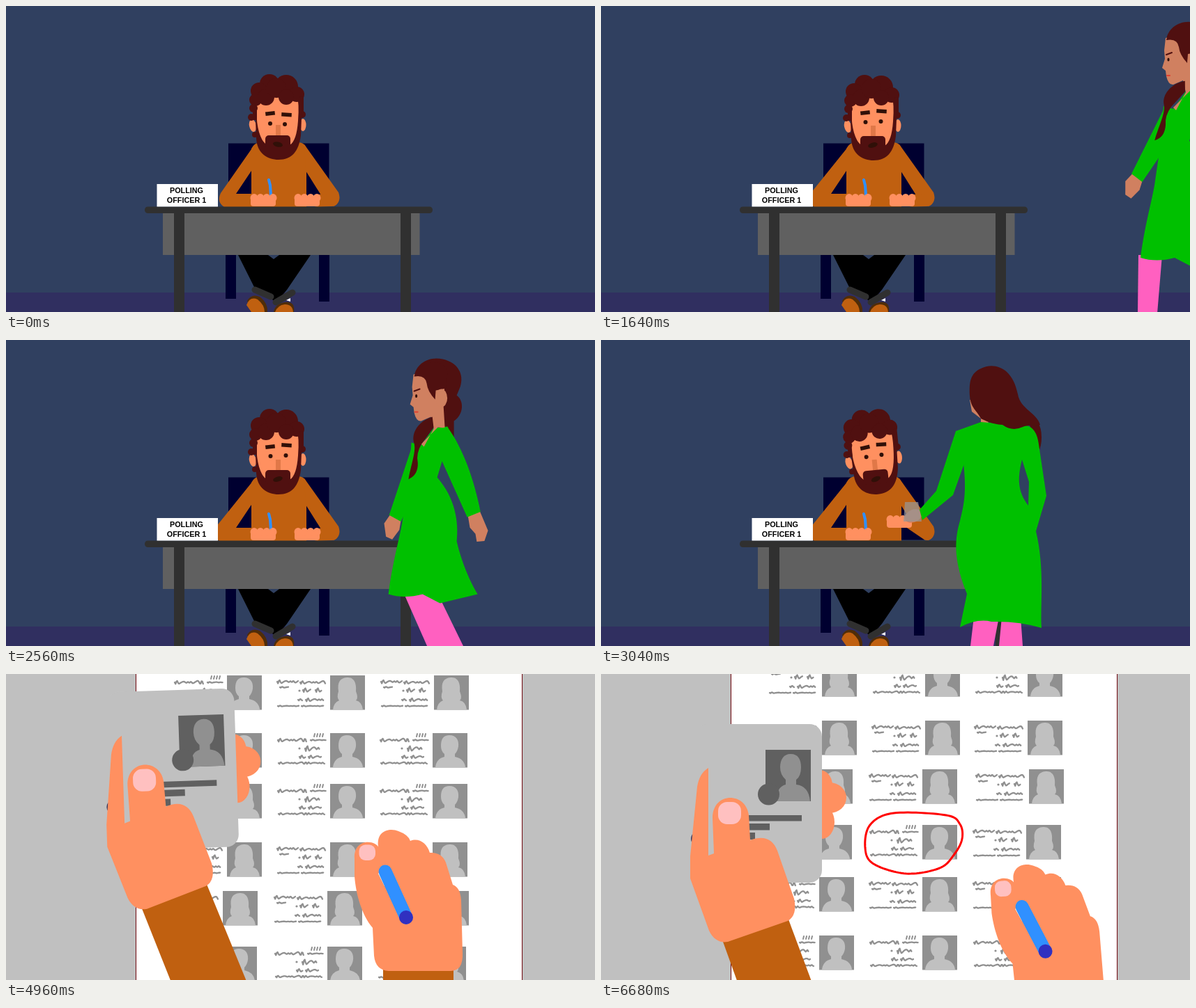
Write an HTML page with a canvas that moves like this. It is 845x440 px and loops after 7.16 s.

```html
<!DOCTYPE html>
<html lang="en">
<head>
<meta charset="utf-8">
<title>Polling officer</title>
<style>
  html, body { margin: 0; width: 100%; height: 100%; overflow: hidden; background: #304060; }
  canvas { display: block; width: 845px; height: 440px; }
</style>
</head>
<body>
<canvas id="stage" width="845" height="440"></canvas>
<script>
const ctx = document.getElementById('stage').getContext('2d');
const LOOP = 7160, STEP = 40;
const HAIR = '#501010', PEACH = '#ff9060', RUST = '#c06010', DARK = '#303030';
const NAVY = '#000030', SKIN = '#d08060', GREEN = '#00c000', PINK = '#ff60c0';
const PALE = '#c0c0c0', MID = '#909090', GREY = '#606060', NAIL = '#ffc0c0', BLUE = '#3090ff';

const clamp01 = v => Math.min(1, Math.max(0, v));
const mix = (a, b, p) => a + (b - a) * p;

function rect(color, x, y, w, h, r = 0) {
  ctx.fillStyle = color;
  ctx.beginPath();
  ctx.roundRect(x, y, w, h, r);
  ctx.fill();
}
function oval(color, x, y, rx, ry = rx, turn = 0) {
  ctx.fillStyle = color;
  ctx.beginPath();
  ctx.ellipse(x, y, rx, ry, turn, 0, 7);
  ctx.fill();
}
function shape(color, d, rule) {
  ctx.fillStyle = color;
  ctx.fill(new Path2D(d), rule || 'nonzero');
}
function line(color, width, points, cap = 'round') {
  ctx.strokeStyle = color;
  ctx.lineWidth = width;
  ctx.lineCap = cap;
  ctx.lineJoin = 'round';
  ctx.beginPath();
  points.forEach(([x, y]) => ctx.lineTo(x, y));
  ctx.stroke();
}
// Draws a group moved by dx, dy and turned about px, py.
function group(dx, dy, turn, px, py, draw) {
  ctx.save();
  ctx.translate(px + dx, py + dy);
  ctx.rotate(turn);
  ctx.translate(-px, -py);
  draw();
  ctx.restore();
}

// ---------- Office ----------
function room() {
  rect('#304060', 0, 0, 845, 440);
  rect('#302f60', 0, 412, 845, 28);
  rect(NAVY, 319, 197.5, 144.5, 90);
  rect(NAVY, 315, 350, 15, 71);
  rect(NAVY, 449, 350, 15, 75);
}

function fist(x, y) {
  rect(PEACH, x + 1, y + 5, 36, 13, 4);
  for (let i = 0; i < 4; i++) oval(PEACH, x + 6 + i * 9, y + 6, 5.5, 6);
}

function manBody(elbow, reach) {
  shape('#000', 'M333 358H376L384 364L392 358H437L403 408L388 426L357 406Z');
  line(DARK, 9, [[357, 408], [380, 418]]);
  line(DARK, 9, [[387, 426], [411, 412]]);
  shape('#502d08', 'M346 424Q352 413 364 418Q376 427 375 440H352Z');
  shape('#502d08', 'M384 440Q386 428 400 426Q415 424 413 440Z');
  shape(RUST, 'M345 430Q350 417 361 422Q371 430 371 440H352Z');
  shape(RUST, 'M386 440Q390 430 400 429Q411 429 412 440Z');
  shape('#fff', 'M402 423L408 420V425Z');

  shape(RUST, 'M352 205Q356 197 364 196H420Q430 197 431 206V289H352Z');
  shape(RUST, `M354 203L${308 - elbow} 269Q${302 - elbow} 282 ${313 - elbow} 289H354V270H330L354 234Z`);
  shape(RUST, 'M428 199L477 268Q482 282 470 288L452 272L430 237Z');
  const hx = mix(413, 409, reach), hy = mix(270, 252, reach);
  line(RUST, 18, [[468, 279], [hx + 34, hy + 10]]);
  line(BLUE, 4, [[377, 250], [379, 258], [380, 272]]);
  fist(350, 270);
  fist(hx, hy);
}

function manHead(lift, tilt, look) {
  group(tilt, lift, -.1 * tilt, 391, 165, () => {
    oval(PEACH, 354, 172, 5, 9, -.2);
    oval(PEACH, 426, 171, 4.5, 9);
    shape(HAIR, 'M357 135L359 190C360 212 375 221 391 221C410 221 420 209 423 186L425 135Z');
    shape(PEACH, 'M361 125C358 150 359 172 365 187Q369 197 375 200H407Q417 194 419 165Q421 140 417 125Z');
    [[378, 112, 14], [402, 116, 17], [363, 122, 12], [358, 135, 9], [355, 147, 6], [352, 160, 5],
     [417, 127, 11], [373, 131, 12], [388, 118, 14], [402, 131, 11], [425, 156, 5], [357, 185, 4]]
      .forEach(([x, y, r]) => oval(HAIR, x, y, r));
    rect(HAIR, 354, 140, 6, 24);
    rect(HAIR, 420, 130, 7, 30, 3);
    rect('#e07848', 387, 171, 7, 17);
    rect(HAIR, 372, 186, 36, 20, 5);
    line('#301008', 5.5, [[375, 155 - look * 2], [383, 154 - look * 2]], 'square');
    line('#301008', 5.5, [[398, 156 - look * 6], [407, 156.5 - look * 6]], 'square');
    oval('#301008', 379 + look * .5, 169 - look * 3, 3);
    oval('#301008', 400 + look * 1.5, 170 - look * 5, 3);
    oval('#301008', 390, 199, 7, 3.5, mix(.2, -.3, look));
  });
}

function desk() {
  rect(GREY, 225, 294, 368.5, 64);
  rect(DARK, 241, 294, 15, 146);
  rect(DARK, 566, 294, 15, 146);
  rect(DARK, 199, 288.5, 413, 9.5, 4.5);
  rect('#fff', 216.5, 256, 87.5, 32.5);
  ctx.fillStyle = '#000';
  ctx.font = 'bold 10.8px "Liberation Sans", Arial, sans-serif';
  ctx.textAlign = 'center';
  ctx.fillText('POLLING', 259, 269);
  ctx.fillText('OFFICER 1', 259, 283);
}

function womanWalking(x, t) {
  const swing = Math.cos((t - 1640) / 747 * Math.PI * 2), spread = Math.abs(swing);
  const leg = s => {
    const top = 682 - 31 * s, foot = 721 - 74 * s, half = 18 - 4 * spread;
    shape(PINK, `M${top - half - 3} 362H${top + half + 3}L${foot + half} 446H${foot - half}Z`);
  };
  group(x - 668, -4 * spread, 0, 0, 0, () => {
    shape(HAIR, 'M674 53C676 35 695 23 715 28C737 33 746 50 740 68L735 80C746 88 745 108 731 117V150L712 130Z');
    group(0, 0, swing * .16, 680, 150, () => {
      shape(SKIN, 'M641 253L633 265L636 284L645 288L655 274L657 260Z');
      shape(GREEN, 'M672 150L700 170L657 262L640 253Z');
    });
    leg(-swing);
    leg(swing);
    shape(GREEN, 'M702 127L722 125L730 150L714 175L707 198C733 228 738 262 735 290C742 320 754 348 765 366L711 379L686 366Q660 373 637 366C643 320 652 290 657 262L666 200L670 148L684 152Z');
    shape(SKIN, 'M673 50L671 68L672 80L668 93L673 97L674 105Q677 118 684 117L698 111L702 128L688 154L684 150L708 126L718 127L716 95L718 60L695 45Z');
    shape(HAIR, 'M674 53C680 30 715 25 722 45L720 70L705 73L704 86Q693 74 692 63Q690 50 674 53Z');
    oval(SKIN, 713, 84, 8.5, 13);
    line(HAIR, 2, [[674, 74], [682, 71]]);
    oval('#301008', 677, 81, 1.6, 2.5);
    line('#e04030', 2, [[675, 104], [679, 104]]);
    group(0, 0, swing * .12, 694, 118, () =>
      shape(HAIR, 'M700 111C680 117 670 135 674 148C678 160 671 177 667 201Q681 195 680 177Q677 164 685 150L702 126Z'));
    group(0, 0, (swing - .05) * .12, 720, 135, () => {
      shape(SKIN, 'M752 253L769 246L781 274L776 289L765 290L763 279L755 270Z');
      shape(GREEN, 'M706 140Q712 124 722 126C745 158 760 200 770 247L751 255L713 172Z');
    });
  });
}

function womanBack(p) {
  const at = (a, b) => mix(a[0], b[0], p) + ' ' + mix(a[1], b[1], p);
  group(20 * (1 - p), 0, 0, 0, 0, () => {
    shape(PINK, 'M535 398H571L563 440H530ZM575 398H602L605 440H571Z');
    shape(SKIN, 'M529 86L532 103L545 113V121L556 120L550 90Z');
    shape(HAIR, 'M610 110Q632 112 632 140Q632 152 628 160L618 130Z');
    shape(GREEN, 'M545 118L509 131L520 178C525 220 520 240 515 260C506 290 507 320 525 365L515 413Q540 400 560 405Q600 404 632 414C630 380 637 330 624 275L639 224L628 150Q625 126 610 123Z'
      + 'M604 172L614 204L613 238C598 218 597 200 604 172Z', 'evenodd');
    const wx = mix(512, 458, p), wy = mix(287, 251, p);
    oval(SKIN, wx - 10, wy + 2, 13, 9, -.4);
    shape('rgba(150,150,150,.72)', `M${wx - 22} ${wy - 18}h19l5 28h-26Z`);
    shape(GREEN, `M509 131L${at([495, 215], [481, 217])}L${at([504, 285], [457, 244])}L${at([520, 286], [461, 259])}L${at([518, 222], [505, 223])}L521 178L540 130Z`);
    shape(HAIR, 'M545 41C562 32 590 37 598 78C602 100 625 104 630 122C620 123 612 122 605 125Q590 132 576 122C560 121 552 116 545 113C540 102 530 98 529 80C528 60 530 48 545 41Z');
  });
}

function office(t) {
  const reach = clamp01((t - 2640) / 400);
  const nod = Math.floor(clamp01((t - 20) / 500) * 5) / 5;
  const look = t < 680 ? 0 : t < 920 ? .5 : 1;
  room();
  manBody(t < 120 ? 0 : t < 680 ? 3 : 7, reach);
  manHead(t < 120 ? 0 : 1 - 12 * Math.sin(Math.PI * nod), reach, look);
  desk();
  if (t >= 2680) womanBack(reach);
  else if (t >= 1240) womanWalking(805 - .245 * (t - 1640), t);
}

// ---------- Voter list ----------
// Row top, photo columns, and the handwriting kind of each column.
const ROWS = [
  [21, 315, 465, 618, 'BAA'], [100, 317, 465, 614, 'ABA'], [176, 317, 465, 614, 'BAA'],
  [259, 317, 465, 612, 'BBB'], [332, 317, 465, 612, 'ABB'], [416, 317, 465, 612, 'AAA'],
  [486, 311, 461, 614, 'AAA'], [566, 310, 461, 610, 'BBA'], [641, 313, 461, 610, 'BAA'],
  [725, 313, 461, 610, 'BBB']
];

function scribble(x, y, w, amp, width = 2.3) {
  const pts = [];
  for (let i = 0; i <= w; i += 1.2)
    pts.push([x + i, y + amp * Math.sin(i * .95 + Math.sin(i * .31) * 2) * (.65 + .35 * Math.cos(i * .17))]);
  line(MID, width, pts);
}

function writing(kind, x, y) {
  if (kind === 'A') {
    scribble(x + 1, y + 9, 30, 2.6);
    scribble(x + 34, y + 10, 37, 2.2);
    scribble(x + 5, y + 17, 13, .8);
    scribble(x + 38, y + 21, 11, 3);
    scribble(x + 56, y + 21, 9, 3);
    oval(MID, x + 33, y + 22, 1.6);
    scribble(x + 31, y + 35, 6, 1.2);
    scribble(x + 42, y + 35, 26, 2.4);
    scribble(x + 2, y + 44, 30, .7);
    scribble(x + 36, y + 44, 32, .7);
  } else {
    for (let i = 0; i < 4; i++) line(MID, 2, [[x + 55 + i * 4, y + 1], [x + 54 + i * 4, y + 5]]);
    scribble(x + 2, y + 10, 42, 2.4);
    scribble(x + 49, y + 10, 22, .8);
    oval(MID, x + 33, y + 22, 1.6);
    scribble(x + 41, y + 22, 21, 4);
    scribble(x + 33, y + 34, 9, 2.2);
    scribble(x + 46, y + 34, 18, 2.2);
    scribble(x + 3, y + 43, 67, 1.4);
  }
}

function portrait(kind, x, y) {
  ctx.save();
  ctx.translate(x, y);
  rect(MID, 0, 0, 50, 49.5);
  if (kind === 'A') shape(PALE, 'M24 3C36 2 38 14 37 23Q41 33 37 36Q46 38 47 49.5H4Q5 39 13 36Q9 32 12 23C10 10 14 4 24 3Z');
  else shape(PALE, 'M24 3C34 3 38 10 37 19Q36 26 32 30V34Q46 37 47 49.5H4Q5 37 17 34V30Q12 26 12 18C12 8 16 3 24 3Z');
  ctx.restore();
}

function sheet(scroll) {
  rect(PALE, 0, 0, 845, 440);
  rect('#700810', 186, 0, 555, 440);
  rect('#fff', 187, 0, 553, 440);
  for (const [top, a, b, c, kinds] of ROWS) {
    const y = top - scroll;
    [a, b, c].forEach((x, i) => {
      writing(kinds[i], x - 77, y);
      portrait(kinds[i], x, y);
    });
  }
}

function cardHand() {
  oval(PEACH, 310, 103, 18, 22);
  oval(PEACH, 324, 121, 24, 22);
  oval(PEACH, 313, 156, 18, 24);
  rect(PALE, 130, 15, 183, 228, 18);
  rect(GREY, 232, 52, 65, 74);
  shape(MID, 'M268 58C279 58 283 66 283 77Q283 90 276 95V102Q294 104 296 126H247Q248 105 261 102V95Q253 88 253 77C253 66 258 58 268 58Z');
  oval(GREY, 236.5, 116, 15.5);
  rect(GREY, 195, 146, 89, 8.5);
  rect(GREY, 195, 158, 43, 9.5);
  rect(GREY, 195, 171, 22, 10);
  oval('#33365c', 131, 180, 6, 8);
  shape(RUST, 'M171 328L265 296L430 740H319Z');
  shape(PEACH, 'M150 78V204L158 201L156 150C156 112 204 112 208 146L210 182C230 174 243 181 249 197L273 266Q278 290 264 298L178 328Q160 331 151 312L124 237V205L134 105Q137 86 150 78Z');
  rect(NAIL, 164, 127, 33, 32, 13);
}

function penHand() {
  rect(RUST, 541, 395, 101, 400);
  shape(PEACH, 'M500 240C498 210 530 212 535 224L541 240L534 222C531 198 552 195 563 200Q577 205 580 214C592 209 604 217 608 231Q625 230 631 245L641 277Q652 281 653 300L655 375Q656 401 638 401H549Q530 400 528 379L526 339C510 320 502 290 500 265Z');
  rect(NAIL, 506.5, 219.5, 23.5, 22.5, 9);
  shape('#fff', 'M534 261L545 252L543 279Z');
  line(BLUE, 19, [[544, 258], [574, 324]]);
  oval('#3030c0', 574, 324, 10);
}

const RING = [[518, 237], [515, 216], [495, 203], [420, 200], [386, 217], [379, 250],
  [391, 273], [438, 287], [486, 279], [507, 259]];

// Point on the closed curve through RING, u from 0 to 1.
function ringPoint(u) {
  const n = RING.length, s = u * n, i = Math.floor(s), f = s - i;
  const [a, b, c, d] = [-1, 0, 1, 2].map(k => RING[(i + k + n) % n]);
  return [0, 1].map(k => b[k] + .5 * f * (c[k] - a[k]
    + f * (2 * a[k] - 5 * b[k] + 4 * c[k] - d[k] + f * (3 * (b[k] - c[k]) + d[k] - a[k]))));
}

// Start time, card hand x, y and turn, pen hand y, scroll.
const TURN = -.033;
const POSES = [
  [3480, -5, 20, TURN, 66, 0], [3600, -5, 12, TURN, 60, 0], [3880, -9, -12, TURN, 40, 0],
  [4200, -19, 8.5, TURN, 51, 0], [4560, 20, 9, TURN, 38, 87], [4960, 20, 9, TURN, 26, 174],
  [5320, -85, 0, 0, 13, 262], [5720, 0, 0, 0, 0, 349], [6680, 4, 57, 0, 0, 349]
];

function closeUp(t) {
  const [, cx, cy, turn, penY, scroll] = POSES.filter(p => p[0] <= t).pop();
  const drawn = t < 5960 ? 0 : Math.min(7, Math.floor((t - 5960) / 100) + 1) / 7;
  sheet(scroll);
  if (drawn) {
    const pts = [];
    for (let i = 0; i <= drawn * 140 + .01; i++) pts.push(ringPoint(i / 140));
    line('#ff0000', 3, pts);
  }
  group(cx, cy, turn, 200, 200, cardHand);
  if (t >= 6680) group(58.5, 78, -.055, 518, 230, penHand);
  else {
    const [x, y] = ringPoint(drawn);
    group(x - 518, y - 237 + penY, 0, 0, 0, penHand);
  }
}

const start = performance.now();
function frame() {
  const t = Math.floor((performance.now() - start) % LOOP / STEP) * STEP;
  if (t < 3480) office(t);
  else closeUp(t);
  requestAnimationFrame(frame);
}
frame();
</script>
</body>
</html>
```
